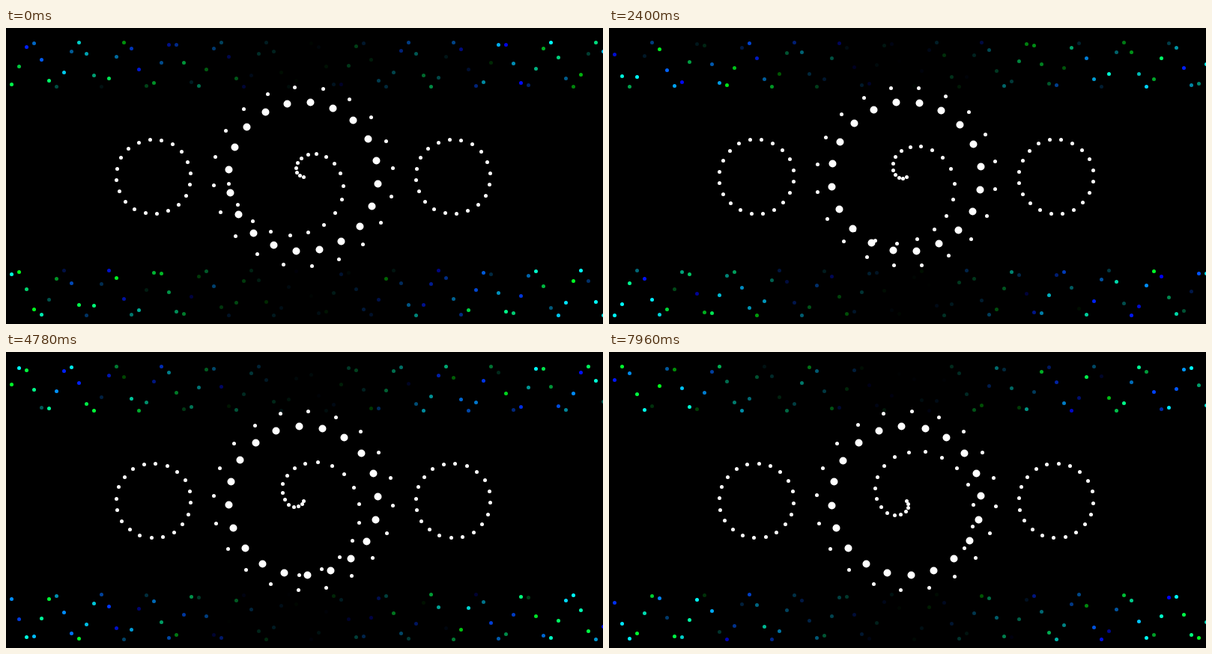
Animation, 797 px wide and 396 px high, one loop 8000 ms. Source, as an HTML page with a canvas:

```html
<!DOCTYPE html>
<html lang="en">
<head>
<meta charset="utf-8">
<title>Dot orbits</title>
<style>
  html, body { margin: 0; width: 100%; height: 100%; overflow: hidden; background: #000; }
  canvas { display: block; width: 797px; height: 396px; }
</style>
</head>
<body>
<canvas id="stage" width="797" height="396"></canvas>
<script>
const ctx = document.getElementById('stage').getContext('2d');
const LOOP = 8000;
const CX = 397, CY = 199;
const DOTS = 20;
const STEP = 2 * Math.PI / DOTS;
const SMALL = 2.5, BIG = 5;

// The picture refreshes about every 47 ms, on a 10 ms clock.
const FIRST = 30.6, INTERVAL = 47.485;

function tickAt(ms) {
  const clock = Math.floor(ms / 10) * 10;
  const shot = Math.floor((clock + 4.99 - FIRST) / INTERVAL) + 1;
  const start = shot > 0 ? FIRST + (shot - 1) * INTERVAL : 0;
  return Math.floor(start * 0.02965 + 0.4);
}

function seeded(seed) {
  let s = seed >>> 0;
  return () => {
    s = (s + 0x6D2B79F5) >>> 0;
    let h = Math.imul(s ^ (s >>> 15), s | 1);
    h ^= h + Math.imul(h ^ (h >>> 7), h | 61);
    return ((h ^ (h >>> 14)) >>> 0) / 4294967296;
  };
}

// Dots sit on whole pixels.
function dot(x, y, r) {
  ctx.beginPath();
  ctx.arc(Math.floor(x) + 0.5, Math.floor(y) + 0.5, r, 0, 2 * Math.PI);
  ctx.fill();
}

function polarDot(cx, angle, dist, r) {
  dot(cx + dist * Math.cos(angle), CY + dist * Math.sin(angle), r);
}

function ring(cx, radius, turn, r) {
  for (let i = 0; i < DOTS; i++) polarDot(cx, turn + i * STEP, radius, r);
}

function spiral(turn) {
  for (let i = 0; i <= DOTS; i++) polarDot(CX, turn + i * STEP, i * 5, SMALL);
}

// Random green and blue, darker towards the middle.
function wave(cy, phase, rand) {
  for (let i = 0; i < 80; i++) {
    const x = 7 + i * 10;
    const range = Math.abs(x - CX);
    const shade = () => Math.min(255, Math.round(rand() * range));
    ctx.fillStyle = `rgb(0, ${shade()}, ${shade()})`;
    dot(x, cy + 30 * Math.sin(phase + i), SMALL);
  }
}

function draw(tick) {
  ctx.fillStyle = '#000';
  ctx.fillRect(0, 0, 797, 396);

  const rand = seeded(tick * 7919 + 17);
  const phase = 2.06 + tick * 0.93808;
  wave(49, phase, rand);
  wave(354.5, phase + 2.05, rand);

  const turn = 0.0932 + tick * 0.01;
  ctx.fillStyle = '#fff';
  ring(CX - 200, 50, -turn, SMALL);
  ring(CX + 200, 50, -turn, SMALL);
  ring(CX, 120, -turn, SMALL);
  ring(CX, 100, turn, BIG);
  spiral(Math.PI - turn);
}

const begin = performance.now();
let shown = -1;

function frame() {
  const tick = tickAt((performance.now() - begin) % LOOP);
  if (tick !== shown) draw(shown = tick);
  requestAnimationFrame(frame);
}
frame();
</script>
</body>
</html>
```
